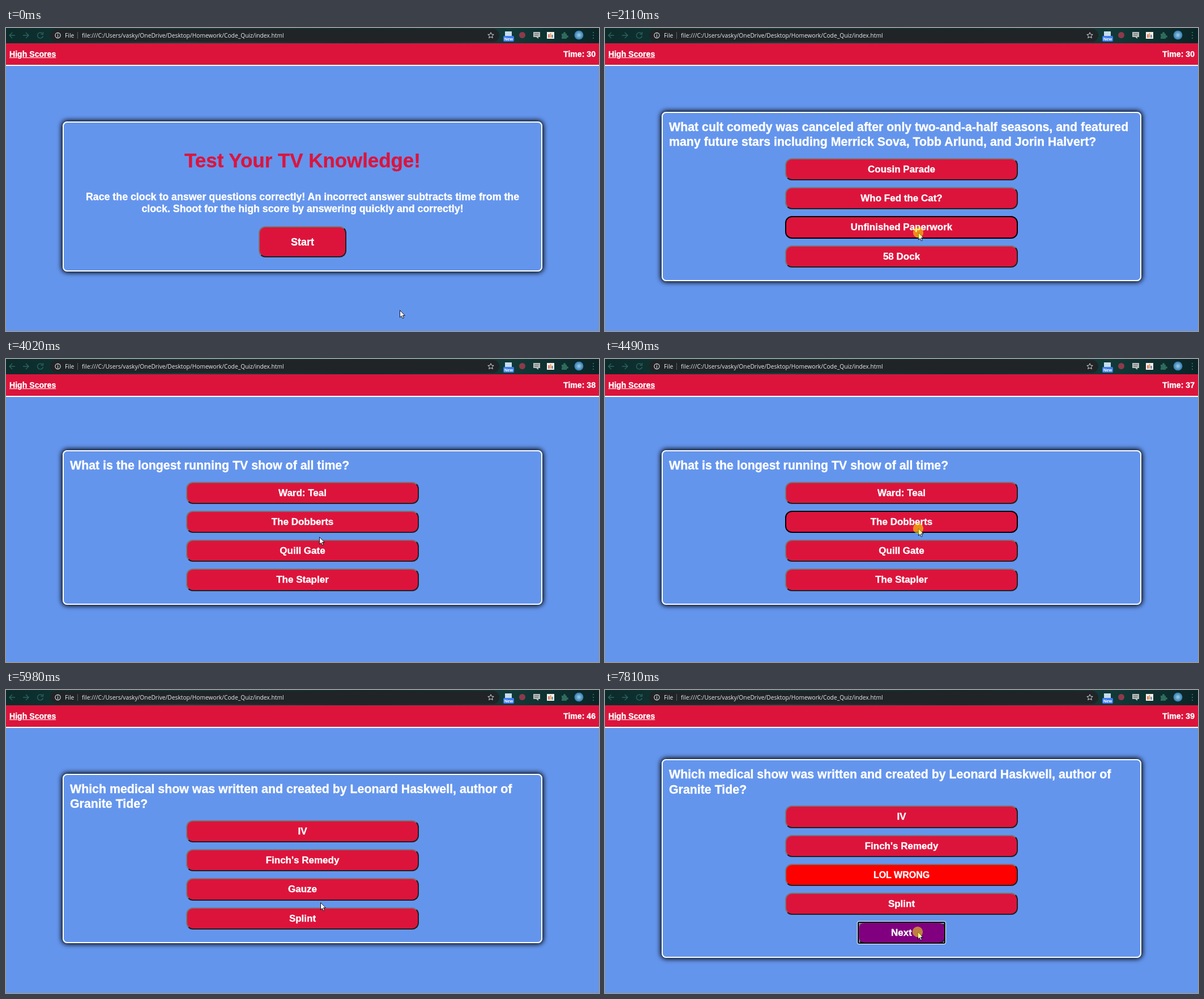
An HTML page that plays this animation: 1047 px wide and 535 px high, repeating every 7990 ms.

```html
<!DOCTYPE html>
<html lang="en">
<head>
<meta charset="utf-8">
<title>TV quiz</title>
<style>
  html, body { margin: 0; width: 100%; height: 100%; overflow: hidden; background: #6495ed; }
  #stage { position: relative; width: 1047px; height: 535px; overflow: hidden; background: #6495ed;
    color: #fff; font: bold 17px "Liberation Sans", Arial, sans-serif; }
  #stage > *, #screen > *, nav > * { position: absolute; box-sizing: border-box; }
  svg { left: 0; top: 0; }
  nav, #screen { -webkit-text-stroke: .35px; }
  nav { top: 27px; left: 0; width: 100%; height: 40px; background: #dc143c; border-bottom: 2px solid #fff;
    font-size: 14.1px; line-height: 38px; }
  nav u { left: 6px; text-underline-offset: 1px; }
  #timer { right: 6px; }
  .card { left: 100px; width: 847px; border: 2px solid #fff; border-radius: 8px; box-shadow: 0 0 8px 2px #000; }
  .title { width: 1047px; text-align: center; color: #dc143c; font-size: 34.9px; line-height: 40px; }
  .intro { width: 1047px; text-align: center; font-size: 17.8px; line-height: 21.7px; white-space: pre; }
  .question { left: 113px; font-size: 21.35px; line-height: 26.5px; white-space: pre; }
  .button { left: 318px; width: 411px; height: 39.2px; line-height: 36px; text-align: center;
    background: #dc143c; border: 2px outset #767676; border-radius: 12px; }
  .small { left: 446px; width: 155px; }
  .start { height: 55px; line-height: 52px; font-size: 18px; }
  .next { background: #800080; }
  .right, .wrong { font-size: 16px; }
  .right { background: #008000; }
  .wrong { background: #f00; }
  .hover { border: 2px solid #000; }
  .ring { left: 445px; width: 157px; border: 1px solid #fff; border-radius: 3px; box-shadow: inset 0 0 0 2px #000; }
</style>
</head>
<body>
<div id="stage">
  <svg id="toolbar" width="1047" height="27" font-family="Open Sans, sans-serif" font-size="10.25" font-weight="400">
    <defs>
      <linearGradient id="theme">
        <stop offset="0" stop-color="#0c2b2b"/><stop offset=".3" stop-color="#14403d"/>
        <stop offset=".6" stop-color="#0d2d2d"/><stop offset=".85" stop-color="#123a38"/>
        <stop offset="1" stop-color="#0a2426"/>
      </linearGradient>
      <radialGradient id="photo">
        <stop offset="0" stop-color="#9fd0ea"/><stop offset="1" stop-color="#2f78ad"/>
      </radialGradient>
    </defs>
    <rect width="1047" height="27" fill="url(#theme)"/>
    <g fill="none" stroke="#2f625c" stroke-width="1.4">
      <path d="M16 13H6M11 8L6 13L11 18M30 13H40M35 8L40 13L35 18"/>
      <path d="M64 9.5A5 5 0 1 0 65.4 14M65.5 7V11H61.5"/>
    </g>
    <rect x="78" y="1.5" width="793" height="23" rx="11.5" fill="#202427"/>
    <circle cx="91.5" cy="13" r="4.6" fill="none" stroke="#e8eaed" stroke-width="1.1"/>
    <path d="M91.5 12.2V15.8M91.5 10V11.3" stroke="#e8eaed" stroke-width="1.2"/>
    <path d="M126.5 7V19" stroke="#5f6368"/>
    <g fill="#e8eaed">
      <text x="104" y="16.5">File</text>
      <text x="134" y="16.5">file:///C:/Users/vasky/OneDrive/Desktop/Homework/Code_Quiz/index.html</text>
    </g>
    <path d="M856 7.8L857.5 11.2L861.2 11.5L858.4 14L859.3 17.6L856 15.7L852.7 17.6L853.6 14L850.8 11.5L854.5 11.2Z" fill="none" stroke="#d5d8da"/>
    <rect x="881" y="6" width="12" height="9" fill="#c5ddec"/>
    <rect x="878" y="14" width="19" height="10" rx="2" fill="#3b7ded"/>
    <text x="887.5" y="21.5" fill="#fff" font-size="7" font-weight="700" text-anchor="middle">New</text>
    <circle cx="911.5" cy="12.5" r="5.5" fill="#8c3a4b"/>
    <path d="M931 7H943V16H940V19L936 16H931Z" fill="#b8bcbc"/>
    <path d="M933 10H941M933 13H940" stroke="#59605f"/>
    <rect x="955" y="7" width="13" height="12" fill="#f1f1ee"/>
    <path d="M958.5 17V11" stroke="#d9534f" stroke-width="2"/>
    <path d="M961.5 17V9" stroke="#e9a13b" stroke-width="2"/>
    <path d="M964.5 17V12" stroke="#4a72b8" stroke-width="2"/>
    <path d="M981 10H984V9A2 2 0 0 1 988 9V10H990V13H991A2 2 0 0 1 991 17H990V19H981V16A2 2 0 0 0 981 13Z" fill="#2f6b5c"/>
    <circle cx="1011.5" cy="12.5" r="8" fill="url(#photo)"/>
    <path d="M1037 7V9M1037 12V14M1037 17V19" stroke="#2f625c" stroke-width="2"/>
  </svg>
  <nav><u>High Scores</u><span id="timer"></span></nav>
  <div id="screen"></div>
  <svg width="1047" height="535">
    <path id="cursor" d="M.5 .5V13L3.4 10.4L5.3 14.8L7.4 13.9L5.5 9.6H9.3Z" fill="#fff" stroke="#000" stroke-width=".9"/>
    <circle id="click" r="9.2" fill="#ff0" fill-opacity=".5"/>
  </svg>
</div>
<script>
const LOOP = 7990, CENTER_Y = 297.5, LINE = 26.5, PITCH = 51.2;
const $ = id => document.getElementById(id);

const quiz = [
  { lines: ["What cult comedy was canceled after only two-and-a-half seasons, and featured",
            "many future stars including Merrick Sova, Tobb Arlund, and Jorin Halvert?"],
    options: ["Cousin Parade", "Who Fed the Cat?", "Unfinished Paperwork", "58 Dock"],
    pick: 2, correct: true },
  { lines: ["What is the longest running TV show of all time?"],
    options: ["Ward: Teal", "The Dobberts", "Quill Gate", "The Stapler"],
    pick: 1, correct: true },
  { lines: ["Which medical show was written and created by Leonard Haskwell, author of",
            "Granite Tide?"],
    options: ["IV", "Finch's Remedy", "Gauze", "Splint"],
    pick: 2, correct: false }
];

// [time, question, answered]
const screens = [[0, -1, false], [1180, 0, false], [2210, 0, true], [3140, 1, false],
                 [4570, 1, true], [5200, 2, false], [6720, 2, true]];
const clock = [[0, 30], [2210, 39], [3240, 38], [4170, 37], [5200, 46], [6155, 45], [7190, 39]];
const presses = [[1100, 1180], [2110, 2210], [2990, 3140], [4490, 4570],
                 [5120, 5200], [6570, 6720], [7810, LOOP]];
// [first step, last step, steps, x, y]
const moves = [[70, 110, 2, 666, 488], [340, 490, 3, 550, 360], [790, 950, 3, 552, 361],
               [1800, 1960, 3, 553, 361], [2440, 2910, 7, 552, 430], [3550, 4020, 7, 553, 314],
               [4090, 4340, 4, 553, 299], [4650, 4970, 5, 551, 411], [5680, 5980, 5, 555, 375],
               [6060, 6250, 3, 556, 353], [6950, 7510, 8, 552, 427]];

const latest = (list, t) => list.filter(item => item[0] <= t).pop();
const smooth = p => p * p * (3 - 2 * p);

function cursorAt(t) {
  let x = 695, y = 498;
  for (const [start, end, steps, toX, toY] of moves) {
    if (t < start) break;
    const done = Math.min(steps, 1 + Math.floor((t - start) / (end - start) * (steps - 1) + 1e-6));
    const p = smooth(done / steps);
    x += (toX - x) * p;
    y += (toY - y) * p;
  }
  return [Math.round(x), Math.round(y)];
}

function add(className, top, text = "", height) {
  const el = document.createElement("div");
  el.className = className;
  el.style.top = top + "px";
  if (height) el.style.height = height + "px";
  el.textContent = text;
  $("screen").append(el);
}

function drawStart(pressed) {
  add("card", 165, "", 265);
  add("title", 214, "Test Your TV Knowledge!");
  add("intro", 287.7, "Race the clock to answer questions correctly! An incorrect answer subtracts time from the\n" +
    "clock. Shoot for the high score by answering quickly and correctly!");
  add("button small start", 350, "Start");
  if (pressed) add("ring", 349, "", 57);
}

function drawQuestion({ lines, options, pick, correct }, answered, pressed, x, y) {
  const height = 246 + lines.length * LINE + (answered ? PITCH : 0);
  const top = CENTER_Y - height / 2;
  const first = top + 29 + lines.length * LINE;
  add("card", top, "", height);
  add("question", top + 13.6, lines.join("\n"));
  options.forEach((option, i) => {
    const rowTop = first + i * PITCH;
    const hit = x >= 318 && x < 729 && y >= rowTop && y < rowTop + 39;
    const chosen = answered && i === pick;
    const result = chosen ? (correct ? " right" : " wrong") : "";
    const label = chosen ? (correct ? "LUCKY GUESS" : "LOL WRONG") : option;
    add("button" + result + (hit ? " hover" : ""), rowTop, label);
  });
  if (!answered) return;
  const nextTop = Math.round(first + 4 * PITCH);
  add("button small next", nextTop, "Next");
  if (pressed) add("ring", nextTop - 1, "", 41);
}

let shown = "";
function render(t) {
  const [x, y] = cursorAt(t);
  const [, index, answered] = latest(screens, t);
  const pressed = presses.some(([down, up]) => t >= down && t < up);
  const state = [x, y, index, answered, pressed].join();
  if (state !== shown) {
    shown = state;
    $("screen").replaceChildren();
    if (index < 0) drawStart(pressed);
    else drawQuestion(quiz[index], answered, pressed, x, y);
    $("cursor").setAttribute("transform", `translate(${x} ${y})`);
    $("click").setAttribute("transform", `translate(${x} ${y})`);
    $("click").style.display = pressed ? "" : "none";
  }
  $("timer").textContent = "Time: " + latest(clock, t)[1];
}

const begin = performance.now();
function tick() {
  render((performance.now() - begin) % LOOP);
  requestAnimationFrame(tick);
}
tick();
</script>
</body>
</html>
```
